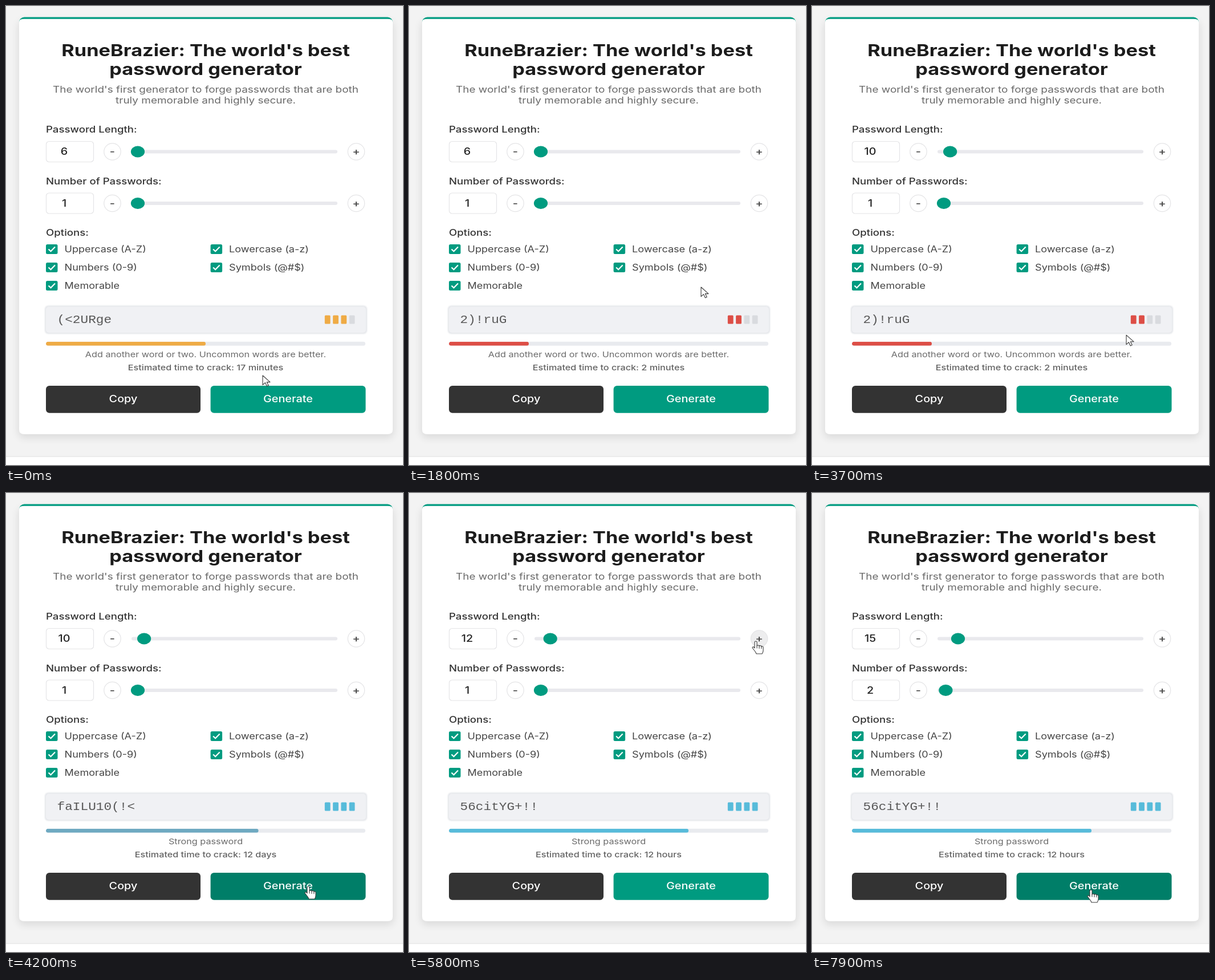
Animation, 696 px wide and 805 px high, one loop 8000 ms. Source, as an HTML page:

```html
<!DOCTYPE html>
<html lang="en">
<head>
<meta charset="utf-8">
<title>Password generator</title>
<style>
  html, body { margin: 0; width: 100%; height: 100%; overflow: hidden; background: #fff; }
  svg { display: block; width: 696px; height: 805px; }
  text { font-family: Inter, sans-serif; white-space: pre; }
  .mono { font-family: "Liberation Mono", monospace; }
</style>
</head>
<body>
<svg id="stage" viewBox="0 0 696 805" xmlns="http://www.w3.org/2000/svg">
  <defs>
    <filter id="soft" x="-10%" y="-10%" width="120%" height="120%"><feGaussianBlur stdDeviation="7"/></filter>
    <filter id="glow" x="-5%" y="-20%" width="110%" height="140%"><feGaussianBlur stdDeviation="1.2"/></filter>
    <clipPath id="barClip"><rect x="70" y="588.7" width="560" height="7" rx="3.5"/></clipPath>
    <clipPath id="page"><rect width="696" height="791"/></clipPath>
  </defs>
</svg>
<script>
const LOOP = 8000, STEP = 100;
const WIDE = 1.18; // the whole page is shown wider than it is tall
const GREEN = '#009b80', INK = '#333';
const RED = [221, 78, 70], ORANGE = [239, 171, 69], BLUE = [87, 187, 218];
const stage = document.getElementById('stage');

function add(tag, attrs, parent = stage) {
  const el = document.createElementNS('http://www.w3.org/2000/svg', tag);
  for (const key in attrs) el.setAttribute(key, attrs[key]);
  parent.appendChild(el);
  return el;
}
function box(x, y, width, height, rx, fill, more) {
  return add('rect', { x, y, width, height, rx, fill, ...more });
}
function label(str, x, y, size, fill, weight = 400, anchor = 'start') {
  const el = add('text', {
    transform: `translate(${x} ${y}) scale(${WIDE} 1)`,
    'font-size': size, 'font-weight': weight, 'text-anchor': anchor, fill
  });
  el.textContent = str;
  return el;
}
const centred = (str, y, size, fill, weight) => label(str, 350, y, size, fill, weight, 'middle');

// page and card
box(0, 0, 696, 790, 0, '#f3f3f3');
box(0, 789.5, 696, 1.5, 0, '#e9e9e9');
box(21, 26, 659, 732, 10, '#000', { opacity: 0.09, filter: 'url(#soft)', 'clip-path': 'url(#page)' });
box(23, 19.5, 655, 60, 9, GREEN);
add('path', { d: 'M23 28Q23 22.8 32 22.8H669Q678 22.8 678 28V743Q678 751 669 751H32Q23 751 23 743Z', fill: '#fff' });

centred("RuneBrazier: The world's best", 87.5, 29.1, '#1c1c1c', 700);
centred('password generator', 120.5, 29.1, '#1c1c1c', 700);
centred("The world's first generator to forge passwords that are both", 151.5, 16.08, '#6a6a6a');
centred('truly memorable and highly secure.', 170.5, 16.08, '#6a6a6a');

function sliderRow(title, y) {
  label(title, 70, y - 33.5, 15.8, INK, 500);
  box(70.5, y - 18, 83, 36, 5, '#fff', { stroke: '#e4e4e6', 'stroke-width': 1.2 });
  const value = label('', 102, y + 5.5, 16.8, '#222', 500, 'middle');
  const round = (cx, sign) => {
    const disc = add('circle', { cx, cy: y, r: 14.7, fill: '#fff', stroke: '#e4e4e6', 'stroke-width': 1.2 });
    label(sign, cx, y + 5.8, 17, '#444', 500, 'middle');
    return disc;
  };
  round(186.5, '-');
  const plus = round(614, '+');
  box(220, y - 3, 361, 6, 3, '#e9e9ed');
  const thumb = add('ellipse', { cy: y, rx: 12.1, ry: 10, fill: GREEN });
  return { value, plus, thumb };
}
const length = sliderRow('Password Length:', 255.5);
const count = sliderRow('Number of Passwords:', 346);

label('Options:', 70, 403, 15.8, INK, 500);
[['Uppercase (A-Z)', 0, 0], ['Lowercase (a-z)', 1, 0], ['Numbers (0-9)', 0, 1],
 ['Symbols (@#$)', 1, 1], ['Memorable', 0, 2]].forEach(([str, col, row]) => {
  const x = 70 + col * 288.6, y = 418 + row * 32;
  box(x, y, 20.5, 17, 2.5, GREEN);
  add('path', { d: `M${x + 4.5} ${y + 8.5}l4 3.8L${x + 16} ${y + 4.5}`, fill: 'none', stroke: '#fff', 'stroke-width': 2.2 });
  label(str, x + 32.5, y + 13.5, 15.35, '#444');
});

// result panel
box(68, 525.5, 565, 49.5, 6, '#e4e6ea', { filter: 'url(#glow)' });
box(70, 527.5, 561, 45.5, 5, '#f0f1f4');
const word = label('', 89.5, 556, 19.3, '#585858');
word.setAttribute('class', 'mono');
const cells = [0, 1, 2, 3].map(i => box(558.8 + i * 14.3, 542.5, 9.8, 15, 1.5, '#d9dbdf'));
box(70, 588.7, 560, 7, 3.5, '#e9ebef');
const bar = box(70, 588.7, 280, 7, 3.5, GREEN, { 'clip-path': 'url(#barClip)' });
const hint = centred('', 616, 13.76, '#6a6a6a');
const crack = centred('', 639, 13.74, '#626262', 500);

box(70, 666, 271, 47.7, 6, '#333');
const button = box(358.6, 666, 271.9, 47.7, 6, GREEN);
label('Copy', 205.5, 694.5, 16.8, '#fff', 500, 'middle');
label('Generate', 494.5, 694.5, 16.8, '#fff', 500, 'middle');

// pointers
const line = { stroke: '#3c3c3c', 'stroke-width': 1.1, 'stroke-linejoin': 'round', 'stroke-linecap': 'round' };
const arrow = add('path', { d: 'M0 0V16.5L4.4 12.6L7.4 18.8L10.2 17.5L7.3 11.6H13Z', fill: '#fff', ...line });
const hand = add('g', line);
add('path', {
  d: 'M-2 1.5Q-2 0 0 0T2 1.5V8Q2 7 4 7T6 8.5Q6 7.5 8 7.7T9.8 9.3Q10 8.5 11.7 9T13 11V16Q13 19 11 22H1Q0 19-3 15.5L-5.7 12Q-6.5 10.5-5 10T-2 12Z',
  fill: '#fff'
}, hand);
add('path', { d: 'M2 8v4M6 8.5v4M9.8 9.3v3.5', fill: 'none' }, hand);

// timelines
const WEAK = 'Add another word or two. Uncommon words are better.', STRONG = 'Strong password';
const results = [
  [-1000, '(<2URge', ORANGE, 3, 0.5, WEAK, '17 minutes'],
  [500, '1(@sIM', RED, 2, 0.25, WEAK, '2 minutes'],
  [1200, '2)!ruG', RED, 2, 0.25, WEAK, '2 minutes'],
  [4000, 'faILU10(!<', BLUE, 4, 0.75, STRONG, '12 days'],
  [4400, '56citYG+!!', BLUE, 4, 0.75, STRONG, '12 hours']
];
const lengthClicks = [2600, 2800, 3000, 3200, 5500, 5700, 5900, 6100, 6300];
const countClicks = [6900];
const path = [ // time, x, y
  [0, 450, 648], [300, 449, 684], [1300, 449, 684], [1800, 512, 493], [2500, 612, 256],
  [2800, 611, 254.5], [3300, 611, 254.5], [3900, 530, 690], [4700, 530, 690], [5400, 609, 258],
  [5700, 608, 260], [6400, 608, 260], [6700, 612, 344], [7300, 612, 346], [7800, 489, 696]
];

const mix = (a, b, p) => a + (b - a) * p;
const rgb = (a, b, p) => `rgb(${a.map((v, i) => Math.round(mix(v, b[i], p)))})`;
const passed = (times, t) => times.filter(at => at <= t).length;

function pointer(t) {
  const i = path.findIndex(key => key[0] > t);
  if (i < 0) return path[path.length - 1].slice(1);
  if (i === 0) return path[0].slice(1);
  const a = path[i - 1], b = path[i], p = (t - a[0]) / (b[0] - a[0]);
  const e = p * p * (3 - 2 * p);
  return [mix(a[1], b[1], e), mix(a[2], b[2], e)];
}
const onButton = ([x, y]) => x > 359 && x < 630 && y > 666 && y < 714;
const onPlus = cy => ([x, y]) => Math.hypot(x - 614, y - cy) < 15;
const onLength = onPlus(255.5), onCount = onPlus(346);

// share of the last 200 ms spent over a control
function hover(test, t) {
  let n = 0;
  for (let k = 0; k < 5; k++) n += test(pointer(t - k * 40));
  return n / 5;
}

function draw(t) {
  const len = 6 + passed(lengthClicks, t), num = 1 + passed(countClicks, t);
  length.value.textContent = len;
  length.thumb.setAttribute('cx', 231 + (len - 6) * 2.78);
  count.value.textContent = num;
  count.thumb.setAttribute('cx', 231 + (num - 1) * 3.42);

  const i = passed(results.map(r => r[0]), t) - 1;
  const [at, str, color, lit, fill, tip, time] = results[i];
  const before = results[Math.max(0, i - 1)];
  const p = 1 - (1 - Math.min(1, (t - at) / 340)) ** 2;
  word.textContent = str;
  hint.textContent = tip;
  crack.textContent = 'Estimated time to crack: ' + time;
  cells.forEach((cell, k) => cell.setAttribute('fill', k < lit ? rgb(color, color, 0) : '#d9dbdf'));
  bar.setAttribute('width', 560 * mix(before[4], fill, p));
  bar.setAttribute('fill', rgb(before[2], color, p));

  const white = [255, 255, 255], grey = [237, 237, 238];
  button.setAttribute('fill', rgb([0, 155, 128], [0, 126, 104], hover(onButton, t)));
  length.plus.setAttribute('fill', rgb(white, grey, hover(onLength, t)));
  count.plus.setAttribute('fill', rgb(white, grey, hover(onCount, t)));

  const pos = pointer(t);
  const over = onButton(pos) || onLength(pos) || onCount(pos);
  for (const el of [arrow, hand]) el.setAttribute('transform', `translate(${pos})`);
  hand.setAttribute('visibility', over ? 'visible' : 'hidden');
  arrow.setAttribute('visibility', over ? 'hidden' : 'visible');
}

const start = performance.now();
function tick() {
  const t = (performance.now() - start) % LOOP;
  draw(Math.floor(t / STEP) * STEP);
  requestAnimationFrame(tick);
}
tick();
</script>
</body>
</html>
```
